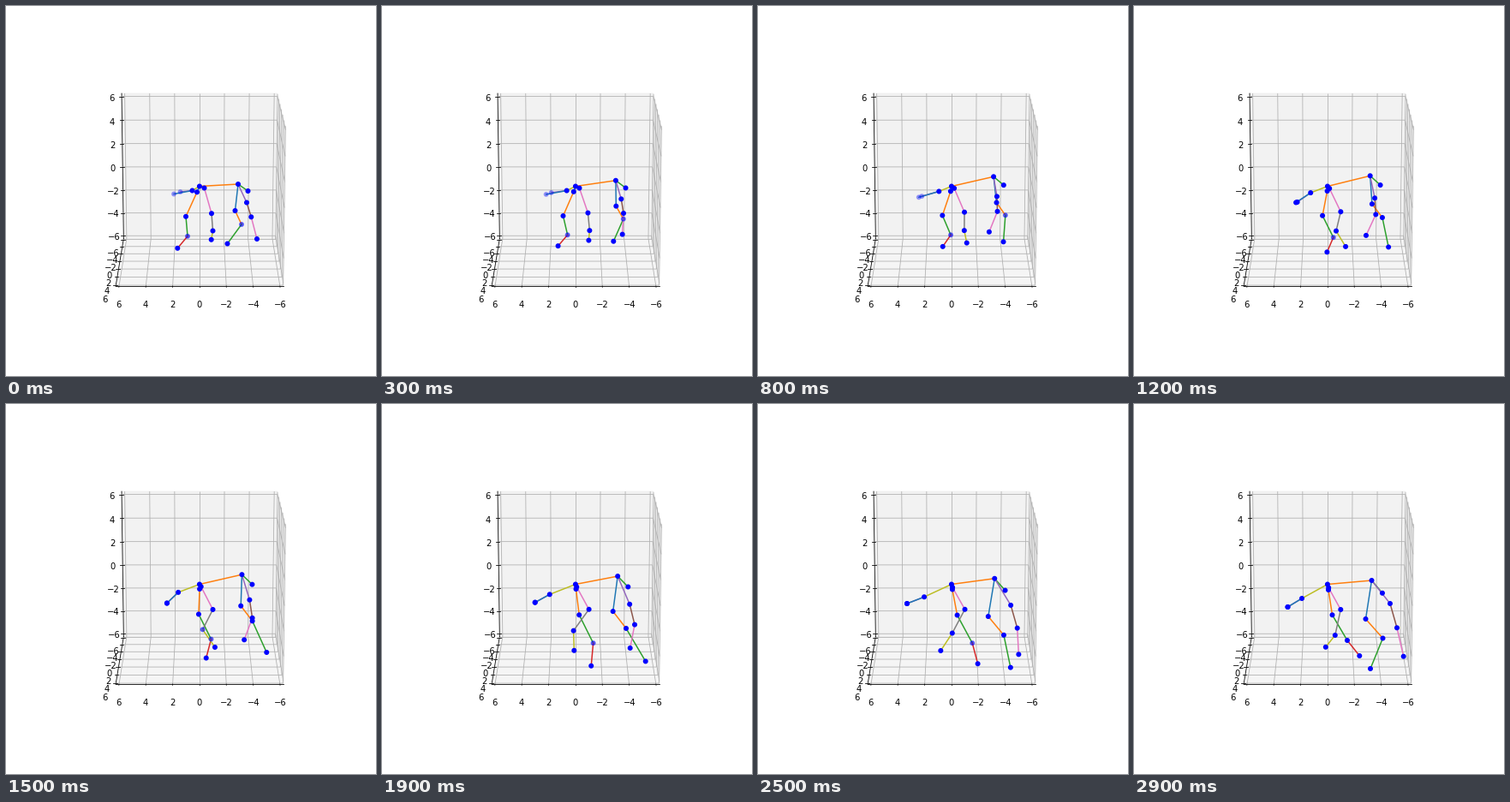
A matplotlib script that plays this animation: 432x432 px, repeating every 3000 ms.

```python
import numpy as np
import matplotlib.pyplot as plt
from matplotlib.animation import FuncAnimation
from matplotlib.collections import LineCollection
from matplotlib.colors import to_rgba
from matplotlib.patches import Polygon

SIZE, FRAMES, INTERVAL = 432, 30, 100
LIM = 6.25                                # half the box edge, in data units
BOX = SIZE * np.array([0.775, 0.755])     # size of the plot area
SCALE = BOX / 0.185
CENTER = SIZE * np.array([0.125, 0.875]) + BOX * [1, -1] * (0.95 / 1.85)
LABEL = LIM + 11.5 * 48 / BOX.sum()       # distance of labels from the centre
ELEV = np.radians(15)
TICKS = range(-6, 7, 2)

plt.rcParams["font.family"] = "DejaVu Sans"
plt.rcParams["font.size"] = 10
fig = plt.figure(figsize=(6, 6), dpi=72, facecolor="white")
ax = fig.add_axes([0, 0, 1, 1])
ax.set_xlim(0, SIZE)
ax.set_ylim(SIZE, 0)
ax.axis("off")


def project(point):
    """Perspective view along the y axis, from slightly above, to pixels."""
    x, y, z = np.asarray(point, float) / 12
    depth = 10 - (y * np.cos(ELEV) + z * np.sin(ELEV))
    up = z * np.cos(ELEV) - y * np.sin(ELEV)
    return CENTER - SCALE * np.array([x, up]) / depth


def moved(point, **coords):
    new = dict(zip("xyz", point), **coords)
    return [new[k] for k in "xyz"]


def line(points):
    xs, ys = zip(*map(project, points))
    ax.plot(xs, ys, color="k", linewidth=0.8)


# Panes, all meeting in the far corner
CORNER = [-LIM, -LIM, -LIM]
for axis, grey in zip("xyz", (0.95, 0.90, 0.925)):
    u, v = [k for k in "xyz" if k != axis]
    square = [moved(CORNER, **{u: a, v: b})
              for a, b in ((-LIM, -LIM), (LIM, -LIM), (LIM, LIM), (-LIM, LIM))]
    ax.add_patch(Polygon([project(p) for p in square], closed=False,
                         facecolor=str(grey), edgecolor=str(grey),
                         alpha=0.5, linewidth=1, zorder=1))

# Axis lines, grid, ticks and labels
EDGES = {"x": ([0, LIM, -LIM], "y"),
         "y": ([LIM, 0, -LIM], "x"),
         "z": ([LIM, -LIM, 0], "x")}
for i, (axis, (edge, tick_dir)) in enumerate(EDGES.items()):
    line([moved(edge, **{axis: s * LIM}) for s in (-1, 1)])
    u, v = "xyz"[(i + 1) % 3], "xyz"[(i + 2) % 3]
    grid = []
    for value in TICKS:
        base = moved(CORNER, **{axis: value})
        path = [moved(base, **{u: LIM}), base, moved(base, **{v: LIM})]
        grid.append([project(p) for p in path])
    ax.add_collection(LineCollection(grid, colors="#b0b0b0", linewidths=0.8,
                                     zorder=2), autolim=False)
    for value in TICKS:
        at = moved(edge, **{axis: value})
        line([moved(at, **{tick_dir: LIM + d}) for d in (-0.1, 0.2)])
        spot = [c if k == axis else np.sign(c) * LABEL
                for k, c in zip("xyz", at)]
        ax.text(*project(spot), str(value).replace("-", "\u2212"),
                ha="center", va="top", color="k")


def path(*points):
    """Smooth curve through a few points (x + yj) spread evenly over a loop."""
    points = np.array(points)
    slopes = np.gradient(points, edge_order=2)
    spans = len(points) - 1

    def at(t):
        u = t / (FRAMES - 1) * spans
        k = min(int(u), spans - 1)
        s = u - k
        return ((1 + 2 * s) * (1 - s) ** 2 * points[k]
                + s * (1 - s) ** 2 * slopes[k]
                + s * s * (3 - 2 * s) * points[k + 1]
                + s * s * (s - 1) * slopes[k + 1])
    return at


PATHS = {
    "neck": path(217.5+215.5j, 209.5+217j, 195.5+222.5j, 196+227j),
    "nose": path(196+219.5j, 188+222.5j, 188.5+232.3j, 174+231.3j, 179.5+237j),
    "shoulder1": path(223+217.3j, 226+216j, 227+217j),
    "elbow1": path(210+245.8j, 217+244.5j, 230.5+246.3j, 231.5+246.3j),
    "wrist1": path(212+268.8j, 228+268j, 247+279.3j, 249+276j),
    "paw1": path(200.3+282.8j, 219.5+282.5j, 245+306j, 263.3+294j),
    "shoulder2": path(231.5+212.5j, 227.8+213.2j, 227.2+214.5j),
    "elbow2": path(240+242.2j, 241.5+240j, 241.3+240j),
    "wrist2": path(241.5+262.5j, 239.5+262.3j, 223.5+264.8j, 234.8+270j),
    "paw2": path(239.7+272.8j, 243.3+276j, 245.2+283.5j, 214+289j, 223.8+283.8j),
    "rump": path(271+208j, 275.5+198.5j, 275.2+201.2j, 277.5+206j),
    "knee1": path(267.5+239j, 279+229.5j, 269.5+242.5j, 270.5+251j),
    "hock1": path(275+255j, 290+244.5j, 285+262.5j, 290.5+273.5j),
    "foot1": path(258.5+277.5j, 291+277j, 307.5+301j, 276+309j),
    "knee2": path(281+229.5j, 279.5+222.5j, 289.5+234j, 299+233j),
    "hock2": path(286.3+246.3j, 280+240.5j, 295.5+258j, 307+261.3j),
    "foot2": path(293+272j, 269+264.5j, 290.5+285.5j, 314.7+294.7j),
}

# Chains of joints, with the colour index of each bone along them
CHAINS = [
    ("root shoulder1 elbow1 wrist1 paw1", (0, 1, 2, 3)),
    ("root shoulder2 elbow2 wrist2 paw2", (5, 6, 7, 8)),
    ("root neck brow", (8, 4)),
    ("neck nose", (0,)),
    ("rump knee1 hock1 foot1", (0, 1, 2)),
    ("root rump tail", (1, 2)),
    ("rump knee2 hock2 foot2", (4, 5, 6)),
]
BONES = [(a, b, color) for chain, colors in CHAINS
         for a, b, color in zip(chain.split(), chain.split()[1:], colors)]

# Joints turned away from the viewer: first frame, end, opacity
FADES = {"brow": (0, 12, 0.3), "nose": (0, 12, 0.3),
         "wrist1": (0, 26, 0.51), "wrist2": (13, 18, 0.51),
         "hock1": (0, 11, 0.51), "knee2": (21, 25, 0.51)}


def pose(t):
    joints = {name: at(t) for name, at in PATHS.items()}
    joints["root"] = complex(*CENTER)
    joints["brow"] = joints["nose"] + (7.5 - 2.5j) * max(0, 1 - t / 15)
    joints["tail"] = joints["rump"] + 11.5 + 8j + (1 + 7j) * t / FRAMES
    return {name: (p.real, p.imag) for name, p in joints.items()}


def opacity(name, t):
    start, end, alpha = FADES.get(name, (0, 0, 1))
    return alpha if start <= t < end else 1


bones = [ax.plot([], [], color=f"C{color}", linewidth=1.5, zorder=4)[0]
         for *_, color in BONES]
dots = ax.scatter(*zip(*pose(0).values()), s=20, c="b", linewidths=1.5,
                  zorder=5)


def draw(t):
    joints = pose(t)
    for bone, (a, b, _) in zip(bones, BONES):
        bone.set_data(*zip(joints[a], joints[b]))
    dots.set_offsets(list(joints.values()))
    dots.set_color([to_rgba("b", opacity(name, t)) for name in joints])
    return [*bones, dots]


anim = FuncAnimation(fig, draw, frames=FRAMES, interval=INTERVAL,
                     repeat=True, repeat_delay=0)
plt.show()
```
